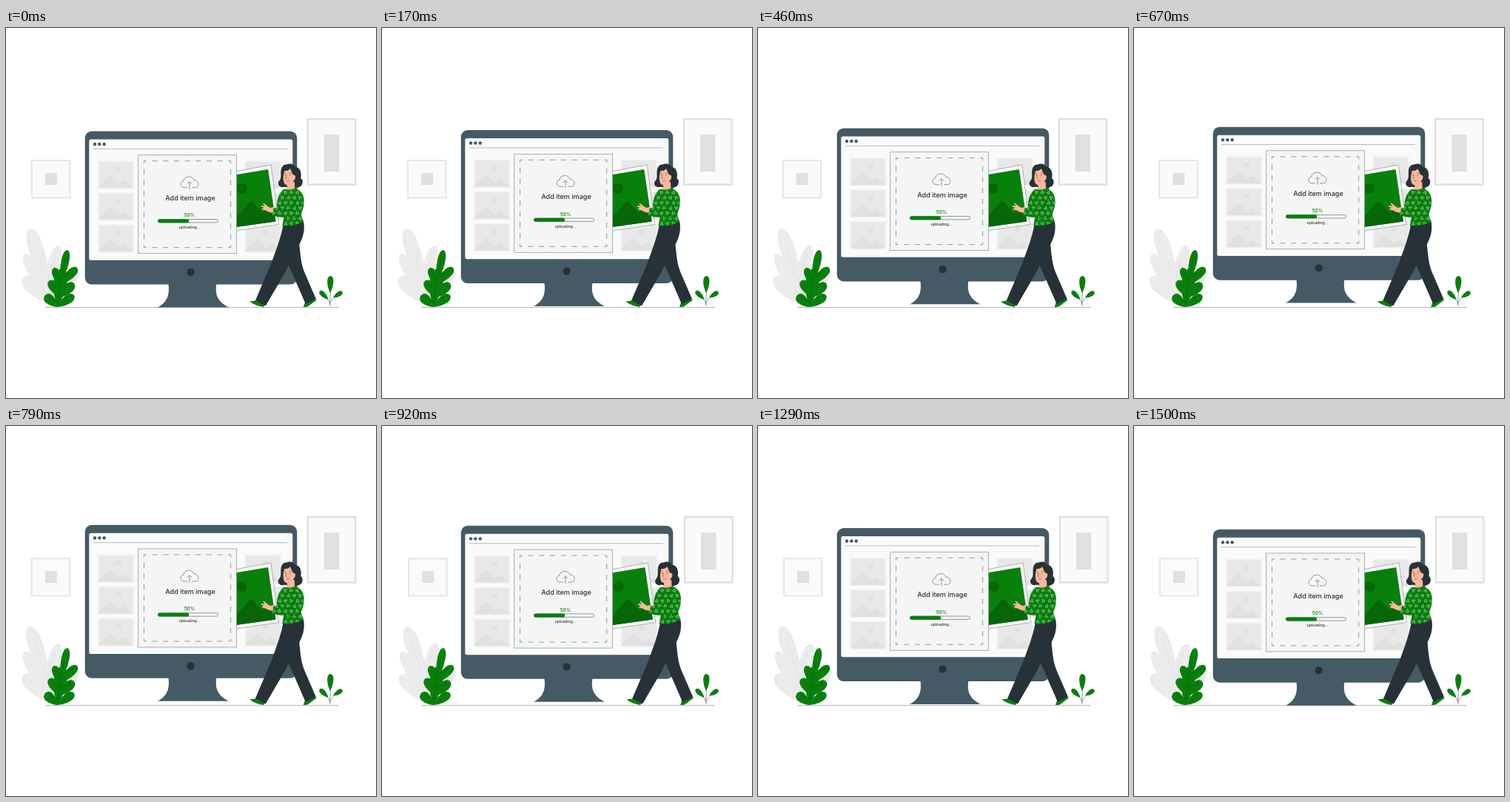
An HTML page for the animation above (1540 ms loop, 500 by 500 pixels).

```html
<!DOCTYPE html>
<html lang="en">
<head>
<meta charset="utf-8">
<title>Add item image</title>
<style>
html, body { margin: 0; width: 100%; height: 100%; overflow: hidden; background: #fff; }
svg { display: block; width: 100vw; height: 100vh; }
text { font-family: Inter, sans-serif; text-anchor: middle; fill: #263238; }
.line { fill: none; stroke: #455a64; stroke-width: .6; }
.grey { fill: #e0e0e0; }
.dark { fill: #263238; }
.slate { fill: #455a64; }
.green { fill: #08800c; }
.deep { fill: #066608; }
.skin { fill: #ffb79c; }
</style>
</head>
<body>
<svg viewBox="0 0 500 500">
  <defs>
    <clipPath id="knit"><use href="#sweater"/></clipPath>
    <g id="thumb">
      <path fill="#f0f0f0" d="M0 0h49v38h-49z"/>
      <path fill="#e8e8e8" d="M1.5 1.5h46v35h-46z"/>
      <path class="grey" d="M1.500 34L15 20.500Q16.500 19 18 20.500L29 32L35 26.500Q36 25.500 37 26.500L47.500 36.500H1.500z"/>
      <circle class="grey" cx="28" cy="11.500" r="3.800"/>
    </g>
  </defs>

  <g class="shake">
    <path fill="#fafafa" stroke="#e0e0e0" stroke-width="1.600" d="M35 179h51.500v50.500h-51.500z"/>
    <path class="grey" d="M53 196h16v16h-16z"/>
    <path fill="#fafafa" stroke="#e0e0e0" stroke-width="2.500" d="M408 123h64.500v88.500h-64.500z"/>
    <path class="grey" d="M430 144h20.500v50h-20.500z"/>
    <g id="pale" fill="#ebebeb"></g>
    <path fill="none" stroke="#dedede" stroke-width=".7" d="M68 377C58 350 46 315 37 284M63 363L84 335M56 344L67 306M62 360L32 345M52 332L32 314"/>
  </g>

  <path d="M53 377.500H450" fill="none" stroke="#a6a6a6" stroke-width=".8"/>

  <g class="float">
    <path class="slate" d="M219 343H285C281 361 287 371 301 377.700H205C218 371 222 361 219 343z"/>
    <rect class="slate" x="106.700" y="139.800" width="286.600" height="207" rx="9"/>
    <rect x="112.300" y="150.800" width="275" height="163.300" rx="2.500" fill="#fafafa"/>
    <circle class="dark" cx="249.700" cy="330.300" r="5.200"/>
    <g class="slate">
      <circle cx="120" cy="157.300" r="2.200"/><circle cx="126.300" cy="157.300" r="2.200"/><circle cx="132.700" cy="157.300" r="2.200"/>
    </g>
    <path d="M118 163.700H380" fill="none" stroke="#9aa2a6" stroke-width=".7"/>
    <g id="thumbs"></g>
  </g>

  <g class="shake">
    <path d="M300 195.500L358.200 185L368.700 265.500L300 275.500z" fill="#fafafa" stroke="#78848a" stroke-width=".6"/>
    <path class="green" d="M300 200L354.300 191L364.700 261.500L300 270.500z"/>
    <circle class="deep" cx="318.800" cy="217" r="7"/>
    <path class="deep" d="M300 270.500V268L329 235.500Q331.500 232.500 334 235.500L347 250L350 246.500Q352 244.500 354 246L363.700 255L364.700 261.500z"/>
  </g>

  <g class="float">
    <rect x="178.700" y="172" width="133" height="133" fill="#f5f5f5" stroke="#858e92" stroke-width=".7"/>
    <rect class="line" x="186.500" y="180" width="117.200" height="117" stroke-dasharray="7 7.650" stroke-dashoffset="3.500"/>
    <path class="line" d="M245 216H241C235 216 234 208 240 207C240 200 252 199 254 206C261 205 262 216 256 216H251M248 218V208M244.800 211L248 207.700L251.200 211"/>
    <text x="249" y="233.200" font-size="9.100" font-weight="500">Add item image</text>
    <text x="248" y="255.500" font-size="6.500" font-weight="500" style="fill:#08800c">50%</text>
    <rect class="line" x="205.500" y="258.800" width="81" height="4.400" rx="2.200"/>
    <rect class="green" x="205.200" y="258.500" width="42" height="5" rx="2.500"/>
    <text x="248" y="271.300" font-size="5.100" font-weight="500">uploading...</text>
  </g>

  <g id="bush" class="green"></g>
  <path fill="none" stroke="#045c07" stroke-width=".5" d="M69 377C71 352 76 332 80 311M75 339L67 330M76 336L91 328M72 353L62 345M73 352L88 349M70 370L58 363M70 369L87 362"/>
  <path class="line" d="M438 376C437 367 439 362 438 350M438 374C437 369 434 365 430 362M438 372C440 366 444 363 448 361"/>
  <g id="sprout" class="green"></g>

  <g class="shake">
    <path class="green" d="M337 368.500L329.600 369.500C334 373.500 341 376 348 377L350 374z"/>
    <path class="green" d="M404 371L417 365.500L420 367.500L408 376.500L402 377.300z"/>
    <path class="dark" d="M380 292L381 318L405 373L419 366L403 329C398 316 398 303 396 288z"/>
    <path class="dark" d="M375 264L402 260C405 274 401 285 395 295C388 309 383 319 377 331L351 375.500L337 368.500L359 317C366 297 372 283 375 264z"/>
    <path class="dark" d="M379 184.500C384 182 390 184 390.500 187.500C398 188 400 196 398.500 203C403 206 401 214 396 215C389 218 381 216 377 214.500C370 217 366 211 369 207C373 203 371 198 371.700 193C372 187 376 184 379 184.500z"/>
    <path class="skin" d="M380 208H390L390.500 217C388 221 380 221 377 218.500L380 216z"/>
    <path class="skin" d="M376.500 193C374.500 199 374 207 377 211C380 214 387 210 390 205C393 201 390 198 389 199C386 197 386 192 384 190C382 193 379 193 376.500 193z"/>
    <path class="line" d="M376.500 196.500L378.500 196M383 196L386 197M379.500 199L378 203L379.500 203.300M379 206.500Q381 207.500 383 206"/>
    <circle class="dark" cx="378" cy="198.700" r=".6"/><circle class="dark" cx="384" cy="199" r=".6"/>
    <path class="skin" d="M364 241.500L357 243L352 239.500L348.500 236.200L347.500 237.500L350 240.500L345 240L345 241.500L349 243L346 244L346.500 245.500L351 246.500C354 249 358 249.500 363 250z"/>
    <path id="sweater" class="green" d="M376 217.500Q384 220 391 216.500C399 219 403 226 403 235C403 242 400 248 399 252L402 261.500Q388 269 373.500 267L375.500 256C371 256 364 255 360 253L362 243L366 243C366 234 368 223 376 217.500z"/>
    <g id="knots" clip-path="url(#knit)" fill="none" stroke="#c7e3c7" stroke-width=".6"></g>
    <path fill="none" stroke="#045c07" stroke-width=".6" d="M366 243C376 246 384 247 388 243L391 233M375.500 256C384 258 393 257 399 252"/>
  </g>
</svg>
<script>
const $ = id => document.getElementById(id);

// Rounded leaf from its foot (x, y) to its tip (tx, ty).
function leaf(x, y, tx, ty, w) {
  const dx = tx - x, dy = ty - y, len = Math.hypot(dx, dy);
  const nx = -dy / len * w, ny = dx / len * w;
  const at = (k, s) => `${x + dx * k + nx * s} ${y + dy * k + ny * s}`;
  return `<path d="M${x} ${y}C${at(.3, .55)} ${at(.95, 1)} ${at(1, 0)}C${at(.95, -1)} ${at(.3, -.55)} ${x} ${y}z"/>`;
}
const leaves = list => list.map(l => leaf(...l)).join("");

$("pale").innerHTML = leaves([
  [58, 350, 32, 271, 17], [55, 350, 72, 294, 13], [60, 370, 25, 305, 14],
  [70, 377, 23, 337, 18], [65, 378, 96, 323, 16], [70, 378, 62, 312, 22]
]);
$("bush").innerHTML = leaves([
  [74, 345, 83, 300, 9], [73, 347, 96, 324, 10], [74, 350, 65, 324, 9],
  [71, 363, 59, 341, 10], [70, 365, 92, 345, 11], [69, 377, 53, 361, 11],
  [69, 377, 92, 361, 10], [69, 377, 76, 325, 15]
]);
$("sprout").innerHTML = leaves([
  [438, 358, 438.500, 335, 7], [435.500, 367, 424, 355.500, 5.500], [442, 364.500, 454.500, 356.500, 5.500]
]);

for (const x of [124.300, 322.700])
  for (let i = 0; i < 3; i++)
    $("thumbs").innerHTML += `<use href="#thumb" x="${x}" y="${179.700 + i * 43}"/>`;

let knots = "";
for (let r = 0; r < 7; r++)
  for (let c = 0; c < 6; c++) {
    const x = 362 + c * 8 + r % 2 * 4, y = 222 + r * 7;
    knots += `<path d="M-2 1.500L2 1.800L.3 -2z" transform="translate(${x} ${y}) rotate(${(r * 50 + c * 35) % 120})"/>`;
  }
$("knots").innerHTML = knots;

const LOOP = 1540, STEPS = 37, CYCLE = 1500, SCALE = 2 / 3;
const PHASES = [[0, 30], [26, 1110], [STEPS, 1530]];
const SHAKE = [0, -1, 2, -4, 4, -4, 4, -4, 2, -1, 0];

function phaseAt(step) {
  const i = step < PHASES[1][0] ? 0 : 1;
  const [a, p] = PHASES[i], [b, q] = PHASES[i + 1];
  return (p + (step - a) / (b - a) * (q - p)) % CYCLE / CYCLE;
}
const move = (name, x, y) => document.querySelectorAll("." + name)
  .forEach(el => el.setAttribute("transform", `translate(${x} ${y})`));

function draw(time) {
  const step = Math.floor((time % LOOP + 6) * STEPS / LOOP) % STEPS;
  const phase = phaseAt(step), slot = Math.floor(phase * 10);
  const from = SHAKE[slot], to = SHAKE[slot + 1];
  move("shake", (from + (to - from) * (phase * 10 - slot)) * SCALE, 0);
  move("float", 0, -10 * SCALE * (1 - Math.abs(1 - 2 * phase)));
}

let start;
function tick(now) {
  start ??= now;
  draw(now - start);
  requestAnimationFrame(tick);
}
draw(0);
requestAnimationFrame(tick);
</script>
</body>
</html>
```
